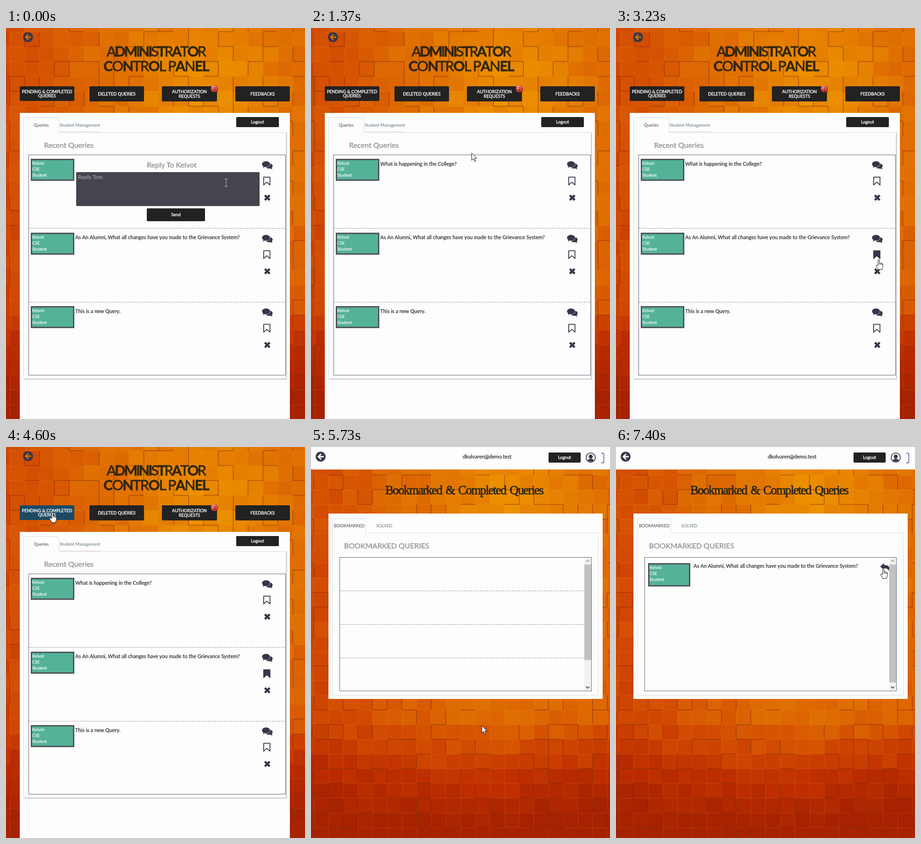
Recreate the animation shown at these times as an HTML page with a canvas. Size 652 by 852 pixels, loop 8000 ms.

```html
<!DOCTYPE html>
<html lang="en">
<head>
<meta charset="utf-8">
<title>Administrator Control Panel</title>
<style>
html, body { margin: 0; width: 100%; height: 100%; overflow: hidden; background: #d85800; }
canvas, svg { position: absolute; left: 0; top: 0; width: 652px; height: 852px; }
text { font-family: Lato, sans-serif; white-space: pre; }
.serif { font-family: "Liberation Serif", serif; word-spacing: 3px; }
</style>
</head>
<body>
<canvas id="wall" width="652" height="852"></canvas>
<svg id="stage" viewBox="0 0 652 852"></svg>
<script>
const LOOP = 8000;
const PERSON = 'Kelvot';
const WHITE = '#fdfdfd', DARK = '#222222', INK = '#36364a', GRAY = '#999999', EDGE = '#dcdcdc', BORDER = '#66667a';
const TAB = '#444444', LINK = '#5f7482';
const QUESTION = 'As An Alumni, What all changes have you made to the Grievance System?';

// ---------- tiled wall ----------
function random(seed) {
  return () => {
    seed = seed + 0x6D2B79F5 | 0;
    let n = Math.imul(seed ^ seed >>> 15, 1 | seed);
    n = n + Math.imul(n ^ n >>> 7, 61 | n) ^ n;
    return ((n ^ n >>> 14) >>> 0) / 4294967296;
  };
}
const HEAT = [[236, 146, 0], [224, 112, 2], [211, 76, 2], [190, 46, 0], [166, 34, 0]];
function heat(t) {
  t = Math.max(0, Math.min(3.999, t / 0.4));
  const i = Math.floor(t), f = t - i;
  return `rgb(${HEAT[i].map((c, k) => Math.round(c + (HEAT[i + 1][k] - c) * f))})`;
}
function makeWall(left, top, size, seed) {
  const canvas = document.createElement('canvas');
  canvas.width = 652; canvas.height = 852;
  const g = canvas.getContext('2d'), rnd = random(seed), shades = [];
  for (let y = top - size; y < 852; y += size) {
    for (let x = left - size; x < 652; x += size) {
      const cx = x + size / 2, cy = y + size / 2;
      const floor = Math.max(0, (cy - 590) / 270) * (0.75 + cx / 1300);
      const t = Math.hypot((cx - 430) / 560, (cy - 140) / 1050) + floor;
      g.fillStyle = heat(t + 0.05 + (rnd() - 0.5) * 0.2);
      g.fillRect(x, y, size + 1, size + 1);
      g.fillStyle = 'rgba(255,180,50,.16)';
      g.fillRect(x, y, size, 1);
      g.fillRect(x, y, 1, size);
      if (rnd() < 0.3) shades.push([x, y + size - 1, size, 2]);
      if (rnd() < 0.3) shades.push([x - 1, y, 2, size]);
    }
  }
  g.fillStyle = 'rgba(110,25,0,.38)';
  shades.forEach(s => g.fillRect(...s));
  return canvas;
}
const walls = [makeWall(8, 8, 32.5, 11), makeWall(6, 29, 32, 29)];

// ---------- drawing helpers ----------
const text = (x, y, s, size, color, { bold = 0, anchor = 'start', extra = '' } = {}) =>
  `<text x="${x}" y="${y}" font-size="${size}" fill="${color}" stroke="${color}" stroke-width="${bold}" text-anchor="${anchor}" ${extra}>${s}</text>`;
const rect = (x, y, w, h, fill, extra = '') =>
  `<rect x="${x}" y="${y}" width="${w}" height="${h}" fill="${fill}" ${extra}/>`;
const frame = (x, y, w, h, color) =>
  rect(x + .5, y + .5, w - 1, h - 1, 'none', `stroke="${color}"`);
const path = (d, fill = 'none', stroke = 'none', extra = '') =>
  `<path d="${d}" fill="${fill}" stroke="${stroke}" ${extra}/>`;
const at = (x, y, body) => `<g transform="translate(${x} ${y})">${body}</g>`;
const dashes = (x1, x2, y) => path(`M${x1} ${y}H${x2}`, 'none', '#8c8c92', 'stroke-dasharray="3 2"');

function button(x, y, w, h, lines, id = '') {
  const first = y + h / 2 + 3.4 - (lines.length - 1) * 4.7;
  return rect(x, y, w, h, DARK, `rx="2" ${id && `id="${id}"`}`) + lines.map((s, i) =>
    text(x + w / 2, first + i * 9.4, s, 9.4, WHITE, { bold: .4, anchor: 'middle' })).join('');
}
const card = (x, y, w, h) =>
  rect(x + 1.5, y + 1.5, w - 3, h - 3, '#54b299', 'stroke="#505458" stroke-width="3"') +
  [PERSON, 'CSE', 'Student'].map((s, i) => text(x + 3, y + 13 + i * 13, s, 9.4, WHITE, { bold: .2 })).join('');
const query = (x, y, s) => text(x, y, s, 11.2, '#2b2b33', { bold: .25 });
const heading = (x, y, s, anchor = 'start') => text(x, y, s, 16.1, GRAY, { bold: .5, anchor });

const bubbles =
  path('M16 5C20 5 23.5 7.5 23.5 10.8Q23.5 13 21.5 14.5Q21.7 16.3 23.5 17.6Q20 17.6 18 16Q12 17.3 9 14Z', INK) +
  path('M9 0C14 0 18 3 18 6.7S14 13.4 9 13.4Q7.5 13.4 6 13Q4 15 .8 15.2Q3 13.5 3 11.8Q0 9.7 0 6.7C0 3 4 0 9 0Z', INK, WHITE, 'stroke-width=".7"');
const mark = id => path('M.9 .9H14.6V18L7.7 11.8L.9 18Z', WHITE, INK, `stroke-width="1.8" stroke-linejoin="round" ${id}`);
const cross = path('M2.5 2.5L13 13M13 2.5L2.5 13', 'none', INK, 'stroke-width="4.6"');
const backIcon = (x, y, arrow) => at(x, y,
  `<circle r="10.8" fill="${INK}"/>` + path('M1 -6L-5 0L1 6M-5 0H7', 'none', arrow, 'stroke-width="3"'));

const rowTools = i => at(0, i * 160.4,
  at(558, 290, bubbles) + at(561, 324, mark(i === 1 ? 'id="mark"' : '')) + at(562, 362, cross));

function bigTitle(y, word, weights, spacing) {
  const letters = [...word].map((c, i) => `<tspan font-weight="${+weights[i] ? 700 : 400}">${c}</tspan>`).join('');
  return text(328 + spacing / 2, y, letters, 31, '#33260f', { bold: .8, anchor: 'middle', extra: `letter-spacing="${spacing}"` });
}

// ---------- screens ----------
const panelScreen =
  backIcon(48, 20, '#d87000') +
  bigTitle(61.5, 'ADMINISTRATOR', '0110110101010', -3.1) +
  bigTitle(93.5, 'CONTROL PANEL', '1010010001011', -1.8) +
  button(30, 127, 119, 32, ['PENDING &amp; COMPLETED', 'QUERIES'], 'pending') +
  button(182, 127, 119, 33, ['DELETED QUERIES']) +
  button(340, 127, 120, 33, ['AUTHORIZATION', 'REQUESTS']) +
  button(500, 127, 119, 33, ['FEEDBACKS']) +
  '<circle cx="454.5" cy="132" r="8" fill="url(#badge)"/>' +
  text(454.5, 135.5, '2', 9.4, '#401010', { anchor: 'middle' }) +
  rect(30, 185, 589, 667, WHITE) +
  button(502, 194, 93, 22, ['Logout']) +
  path('M38.5 764V195.5H115.5V227M116 226.5H206M116 227.5H611', 'none', EDGE) +
  path('M611.5 228V765H39', 'none', '#c6c6c6', 'stroke-width="2"') +
  text(77, 215, 'Queries', 9.4, TAB, { anchor: 'middle' }) +
  text(117, 215, 'Student Management', 9.4, LINK) +
  heading(83, 261, 'Recent Queries') +
  frame(49, 276, 561, 481, BORDER) +
  dashes(50, 609, 436.5) + dashes(50, 609, 597.5) +
  [285, 446, 606].map(y => card(54, y, 95, 48)).join('') +
  [0, 1, 2].map(rowTools).join('') +
  `<g id="form">${heading(361.5, 304, 'Reply To ' + PERSON, 'middle')}` +
  rect(153, 314, 400, 74, '#45454f', 'rx="2"') +
  text(157, 329, 'Reply Text', 12, '#b2b2b2') +
  button(307, 393, 127, 28, ['Send']) + '</g>' +
  `<g id="asked">${query(151, 300, 'What is happening in the College?')}</g>` +
  query(151, 460, QUESTION) + query(151, 621, 'This is a new Query.');

const chevron = (y, d, color) => path(`M600 ${y}L603.5 ${y + d}L607 ${y}`, 'none', color, 'stroke-width="1.8"');
const markedScreen =
  rect(0, 0, 652, 49, WHITE) +
  backIcon(21, 21, WHITE) +
  query(331, 25, 'dkolvaren@demo.test') +
  button(518, 12, 70, 22, ['Logout']) +
  at(610, 23, `<circle r="10" fill="${WHITE}" stroke="${INK}" stroke-width="1.6"/><circle cy="-2.2" r="4.4" fill="${INK}"/>` +
    path('M-6.5 6.5Q-5 2.5 0 2.5T6.5 6.5Q0 11 -6.5 6.5Z', INK)) +
  path('M633 13.5H636.5Q638.5 13.5 638.5 15.5V32.5Q638.5 34.5 636.5 34.5H633', 'none', '#3a3aa8', 'stroke-width="1.3"') +
  text(334, 103, 'Bookmarked &amp; Completed Queries', 27, '#2a2518',
    { bold: .8, anchor: 'middle', extra: 'class="serif" letter-spacing="-1.6"' }) +
  rect(38, 145, 598, 404, WHITE) +
  path('M46.5 187V158.5Q46.5 156.5 48.5 156.5H117.5Q119.5 156.5 119.5 158.5V187.5H626.5V541H46.5V187', 'none', EDGE) +
  text(50, 175, 'BOOKMARKED', 9.4, TAB) +
  text(142, 175, 'SOLVED', 9.4, LINK) +
  heading(72, 221, 'BOOKMARKED QUERIES') +
  `<g id="empty">${[313.5, 386.5, 459.5].map(y => dashes(63, 596, y)).join('')}</g>` +
  `<g id="loaded">${card(70, 253, 92, 51)}${query(169, 263, QUESTION)}` +
  path('M576 260.5L584.5 253V257.2C593 257 596 260 596 264Q596 268 593.5 270Q594.5 264 584.5 264.2V268Z', INK) + '</g>' +
  rect(596, 241, 15, 290, '#f1f1f1') +
  rect(596, 256, 15, 208, '#c1c1c1', 'id="thumb"') +
  chevron(250, -3.5, '#a3a3a3') + chevron(522, 3.5, '#505050') +
  frame(62, 240, 550, 292, BORDER);

const shapes = {
  arrow: path('M.5 .5V16.3L4.2 12.8L6.8 18.8L9.2 17.8L6.7 12H11.6Z', '#fff', '#111'),
  hand: path('M-1.6 14V1.8Q-1.6 .4 0 .4T1.6 1.8V8Q3.8 6.8 4.6 8.6Q6.2 7.8 7 9.4Q9 9 9 11.5V15.5Q8.6 18.5 7.2 20V22.6H-2V20.5Q-5 17 -6 13.5Q-5.2 11 -1.6 14Z M1.6 8V12M4.6 8.8V12M7 9.6V12.4', '#fff', '#111'),
  beam: path('M-3.5 -8H-1Q0 -8 0 -7Q0 -8 1 -8H3.5M0 -7V7M-3.5 8H-1Q0 8 0 7Q0 8 1 8H3.5', 'none', '#c9c9c9')
};

const $ = id => document.getElementById(id);
$('stage').innerHTML =
  '<defs><radialGradient id="badge" cx=".4" cy=".3" r=".75"><stop stop-color="#f3a79a"/><stop offset=".5" stop-color="#dc5348"/><stop offset="1" stop-color="#a32020"/></radialGradient></defs>' +
  `<g id="panel">${panelScreen}</g><g id="marked">${markedScreen}</g><g id="cursor">` +
  Object.entries(shapes).map(([name, body]) => `<g id="${name}">${body}</g>`).join('') + '</g>';

// ---------- timeline ----------
// time, x, y, pointer shape from that time on
const moves = [
  [0, 480, 337, 'beam'], [30, 480, 337, 'beam'], [230, 554, 314, 'arrow'], [360, 570, 298, 'hand'],
  [700, 571, 299, 'hand'], [830, 584, 302, 'arrow'], [1040, 636, 340, 'arrow'], [1370, 350, 272, 'arrow'],
  [1540, 62, 400, 'arrow'], [1670, 110, 537, 'arrow'], [2100, 330, 560, 'arrow'], [2500, 528, 482, 'arrow'],
  [2630, 516, 520, 'arrow'], [2770, 516, 520, 'arrow'], [2900, 573, 504, 'hand'], [3230, 573, 504, 'hand'],
  [3330, 585, 545, 'arrow'], [4030, 616, 684, 'arrow'], [4250, 85, 128, 'hand'], [4300, 101, 142, 'hand'],
  [4600, 101, 142, 'hand'], [4680, 125, 182, 'arrow'], [5330, 372, 607, 'arrow'], [5870, 372, 607, 'arrow'],
  [6670, 322, 262, 'arrow'], [7170, 625, 268, 'arrow'], [7370, 625, 268, 'arrow'], [7400, 583, 264, 'hand'],
  [LOOP, 583, 264, 'hand']
];

const show = (id, on) => $(id).setAttribute('display', on ? 'inline' : 'none');
const wall = $('wall').getContext('2d');
let wallShown = -1;

function draw(t) {
  const second = t >= 5470, closed = t >= 530, loaded = t >= 5870;
  if (wallShown !== +second) {
    wallShown = +second;
    wall.drawImage(walls[wallShown], 0, 0);
  }
  show('panel', !second);
  show('marked', second);
  show('form', !closed);
  show('asked', closed);
  show('empty', !loaded);
  show('loaded', loaded);
  $('thumb').setAttribute('height', loaded ? 257 : 208);
  $('mark').setAttribute('fill', t >= 3230 ? INK : WHITE);
  $('pending').setAttribute('fill', t >= 4240 && t < 4640 ? '#1c4a62' : DARK);

  const i = moves.findIndex((m, k) => t < moves[k + 1][0]);
  const [t0, x0, y0, shape] = moves[i], [t1, x1, y1] = moves[i + 1];
  const p = (t - t0) / (t1 - t0), e = p * p * (3 - 2 * p);
  $('cursor').setAttribute('transform', `translate(${Math.round(x0 + (x1 - x0) * e)} ${Math.round(y0 + (y1 - y0) * e)})`);
  Object.keys(shapes).forEach(name => show(name, name === shape));
}

const start = performance.now();
function tick() {
  draw((performance.now() - start) % LOOP);
  requestAnimationFrame(tick);
}
tick();
</script>
</body>
</html>
```
